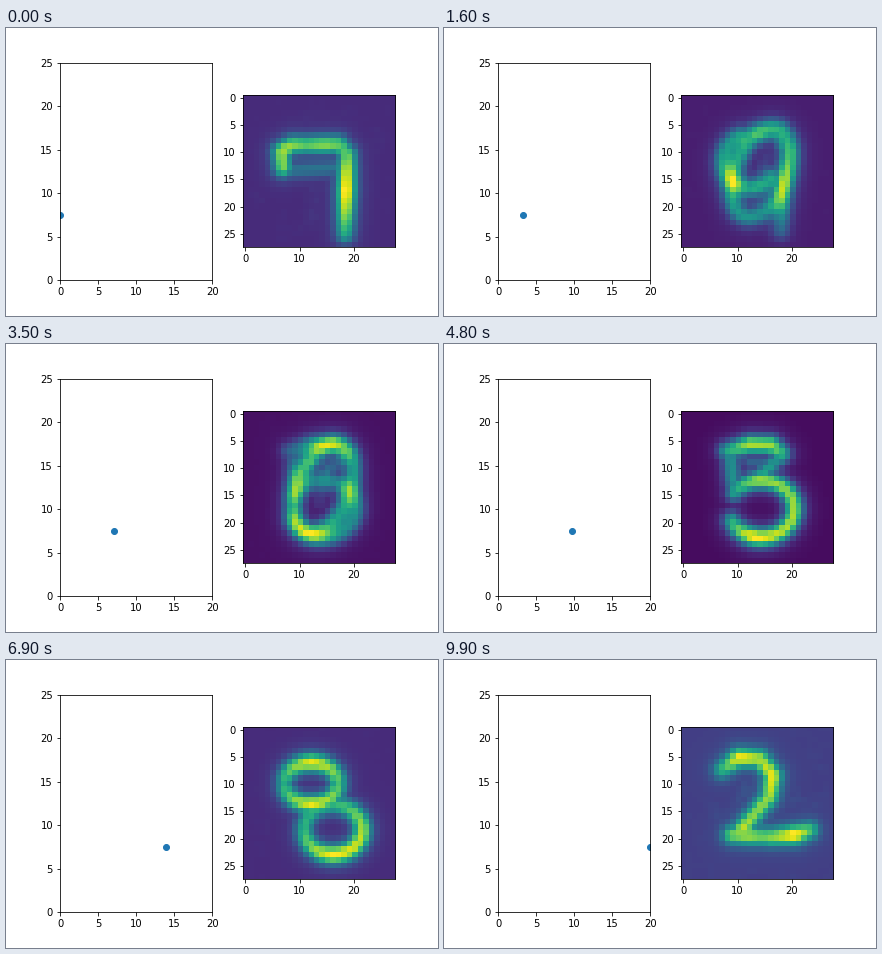
Animation of 432x288 px, one loop 10 s. Source, as a matplotlib script:

```python
import numpy as np
import matplotlib.pyplot as plt
from matplotlib.animation import FuncAnimation

FRAMES = 100
SIZE = 28
SAMPLES = 120
COLS, ROWS = np.meshgrid(np.arange(SIZE), np.arange(SIZE))
rng = np.random.default_rng(4)


def spread(levels):
    """Brightness along a stroke, from evenly spaced levels."""
    return np.interp(np.linspace(0, 1, SAMPLES), np.linspace(0, 1, len(levels)), levels)


def path(points, *levels):
    """Stroke through corner points at even speed."""
    p = np.array(points, float)
    run = np.append(0, np.cumsum(np.hypot(*np.diff(p, axis=0).T)))
    s = np.linspace(0, run[-1], SAMPLES)
    return np.interp(s, run, p[:, 0]), np.interp(s, run, p[:, 1]), spread(levels)


def arc(centre, radii, start, end, *levels, tilt=0):
    """Elliptic stroke; angles in degrees, clockwise from the right."""
    a, t = np.radians(np.linspace(start, end, SAMPLES)), np.radians(tilt)
    u, v = radii[0] * np.cos(a), radii[1] * np.sin(a)
    return (centre[0] + u * np.cos(t) - v * np.sin(t),
            centre[1] + u * np.sin(t) + v * np.cos(t), spread(levels))


def grain():
    """Faint smooth texture, strongest around the digit."""
    n = rng.normal(size=(SIZE, SIZE))
    for axis in (0, 1):
        n = (np.roll(n, 1, axis) + n + np.roll(n, -1, axis)) / 3
    return n * np.exp(-((COLS - 14) ** 2 + (ROWS - 14) ** 2) / 120)


def digit(base, *strokes):
    """Blurry pen strokes with a soft halo over a base level."""
    img = base * (1 + 0.5 * grain())
    for x, y, level in strokes:
        d2 = (COLS[..., None] - x) ** 2 + (ROWS[..., None] - y) ** 2
        cover = 0.85 * np.exp(-d2 / 1.6 ** 2) + 0.15 * np.exp(-d2 / 3.2 ** 2)
        img = np.maximum(img, (base + (level - base) * cover).max(axis=-1))
    return img


def two(base, foot_y, *foot):
    neck = [(7, 7.5), (10, 5.3), (14, 5.5), (16.3, 8.5), (15.7, 12.5), (10.5, foot_y - 0.8)]
    sole = [(8.8, foot_y), (16, foot_y + 0.4), (20.5, foot_y), (23, foot_y - 0.8)]
    return digit(base, path(neck, .6, .95, .82, .92, .8, .77, .86), path(sole, *foot))


seven = digit(
    .115,
    path([(6.8, 13), (6.5, 10), (8.5, 8.8), (17, 8.7), (18.6, 10.5), (18.2, 25)],
         .75, .83, .7, .78, .68, .88, 1, .82, .58),
    path([(8, 13.5), (17, 13)], .36))

nine = digit(
    .1,
    arc((12.2, 11.7), (5, 5), 245, 40, .8, .9, .95, .92),
    path([(12, 6.5), (17, 7), (19, 10), (18.3, 15), (17.8, 24.5)],
         .45, .5, .58, .93, .87, .52))

zero = digit(
    .05,
    arc((14.2, 13.8), (4.8, 8.6), 0, 360, .8, .93, 1, .88, .8, tilt=22),
    path([(15, 11), (13.5, 16.5)], .2))

three = digit(
    .03,
    path([(8, 7), (12, 5.8), (16, 5.9), (18, 7.5), (14, 11.8)], .58, .85, .82, .48, .6),
    path([(8.5, 8), (9, 12.5)], .48),
    path([(12, 9), (15, 9)], .3),
    arc((14.2, 17.6), (6, 5.2), 215, 515, .55, .85, .8, .83, .87, 1, .58))

eight = digit(
    .12,
    arc((12, 10), (4.9, 3.8), 90, 450, .95, .58, .95, .68, .95),
    arc((16, 18.5), (5.3, 4.5), 270, 630, .62, .85, .97, .62, .62))

DIGITS = [seven, nine, zero, three, eight,
          two(.16, 19.7, .7, .74, .62, .8, 1, .65),
          two(.175, 19.4, .75, .82, .72, .82, 1, .68)]
STOPS = [0, 8, 25, 48, 69, 82, 99]


def blend(frame):
    """Fade between neighbouring digits, keeping the peak at full brightness."""
    pos = np.interp(frame, STOPS, range(len(STOPS)))
    k = min(int(pos), len(DIGITS) - 2)
    img = DIGITS[k] + (pos - k) * (DIGITS[k + 1] - DIGITS[k])
    return img / img.max()


fig, (track, view) = plt.subplots(1, 2, figsize=(6, 4), dpi=72)
fig.subplots_adjust(left=0.125, right=0.9, bottom=0.125, top=0.88, wspace=0.2)
track.set(xlim=(0, 20), ylim=(0, 25), xticks=range(0, 21, 5), yticks=range(0, 26, 5))
dot, = track.plot([0], [7.5], "o", color="C0", markersize=6)
picture = view.imshow(blend(0), cmap="viridis", vmin=0, vmax=1, interpolation="nearest")
view.set(xticks=range(0, 21, 10), yticks=range(0, 26, 5))


def update(frame):
    dot.set_data([20 * frame / (FRAMES - 1)], [7.5])
    picture.set_data(blend(frame))
    return dot, picture


anim = FuncAnimation(fig, update, frames=FRAMES, interval=100, repeat=True, repeat_delay=0)
plt.show()
```
